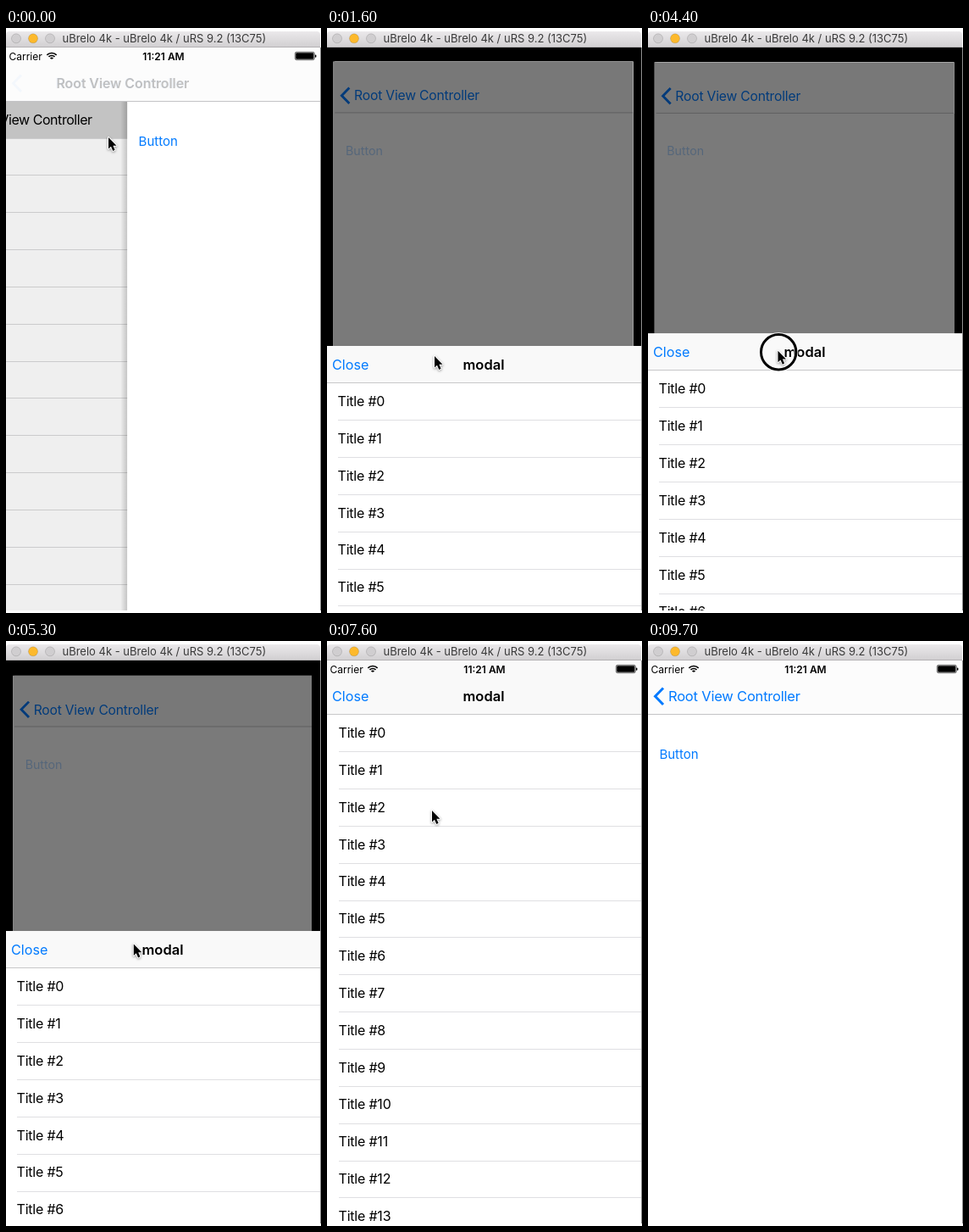
An HTML page with a canvas that plays this animation: 372 by 690 pixels, repeating every 9800 ms.

```html
<!DOCTYPE html>
<html lang="en">
<head>
<meta charset="utf-8">
<title>Half modal demo</title>
<style>
html, body { margin: 0; width: 100%; height: 100%; overflow: hidden; background: #fff; }
canvas { display: block; }
</style>
</head>
<body>
<canvas width="372" height="690"></canvas>
<script>
const ctx = document.querySelector('canvas').getContext('2d');
const LOOP = 9800, STEP = 100;
const W = 371, TOP = 23, BOTTOM = 687, HALF = 375, ROW = 43.85;
const BLUE = '#007aff';

// Timing in ms
const PRESENT = 1050, EXPAND = 6430, DISMISS = 8300;
const DRAG = 1000, GLIDE = 300, TAP = 150, LIFT = 82;
const drags = [
  { at: 2110, x: 123.5, grip: 9 },
  { at: 4130, x: 153.5, grip: 20.5 },
  { at: 5430, x: 149, grip: 12 }
];
const taps = [950, 8200];

const clamp = v => Math.max(0, Math.min(1, v));
const mix = (a, b, u) => a + (b - a) * u;

// Eased 0..1 from start over length
function ramp(t, start, length) {
  const u = clamp((t - start) / length);
  return u * u * (3 - 2 * u);
}

// Top of the half-open sheet: each drag pulls it up, then it falls back
function handleAt(t) {
  return drags.reduce((y, { at }) =>
    y - LIFT * (ramp(t, at, DRAG) - ramp(t, at + DRAG, GLIDE)), HALF);
}

function sheetTop(t) {
  const open = mix(handleAt(t), TOP, ramp(t, EXPAND, 500));
  return mix(BOTTOM, open, ramp(t, PRESENT, 450) - ramp(t, DISMISS, 500));
}

function cursorAt(t) {
  const handle = handleAt(t);
  const moves = [
    { at: 500, x: 42, y: 136 },
    { at: 1200, x: 127, y: 387 },
    ...drags.map(d => ({ at: d.at - GLIDE, x: d.x, y: handle + d.grip })),
    { at: EXPAND + 100, x: 124, y: 200 },
    { at: 7850, x: 28, y: 66 },
    { at: 8900, x: 392, y: 300 }
  ];
  return moves.reduce((p, { at, x, y }) => {
    const u = ramp(t, at, GLIDE);
    return { x: mix(p.x, x, u), y: mix(p.y, y, u) };
  }, { x: 121, y: 129 });
}

function isPressed(t) {
  const during = (start, length) => t >= start && t < start + length;
  return taps.some(at => during(at, TAP)) || drags.some(d => during(d.at, DRAG));
}

function rect(x, y, w, h, color) {
  ctx.fillStyle = color;
  ctx.fillRect(x, y, w, h);
}

function circle(x, y, r) {
  ctx.beginPath();
  ctx.arc(x, y, r, 0, 7);
}

function stroke(color, width) {
  ctx.strokeStyle = color;
  ctx.lineWidth = width;
  ctx.stroke();
}

// y is the middle of the capital letters
function text(str, x, y, size, { color = '#000', weight = 400, align = 'left', spacing = 0 } = {}) {
  ctx.font = `${weight} ${size}px Inter, sans-serif`;
  ctx.letterSpacing = spacing + 'px';
  ctx.textAlign = align;
  ctx.fillStyle = color;
  ctx.fillText(str, x, y + size * 0.36);
}

function faded(alpha, paint) {
  ctx.save();
  ctx.globalAlpha *= alpha;
  paint();
  ctx.restore();
}

function titleBar() {
  const g = ctx.createLinearGradient(0, 4, 0, 22);
  g.addColorStop(0, '#ebe9eb');
  g.addColorStop(1, '#d2d0d2');
  ctx.fillStyle = g;
  ctx.beginPath();
  ctx.roundRect(0, 4, W, 18, [4, 4, 0, 0]);
  ctx.fill();
  rect(0, 22, W, 1, '#b4b2b4');
  ['#d0ced0', '#fdb92c', '#d0ced0'].forEach((color, i) => {
    circle(12 + 20 * i, 12.3, 5.5);
    ctx.fillStyle = color;
    ctx.fill();
    stroke('rgba(0,0,0,.13)', 1);
  });
  text('uBrelo 4k - uBrelo 4k / uRS 9.2 (13C75)', 66.5, 12.6, 13, { color: '#3a3a3a' });
}

function statusBar() {
  text('Carrier', 3.5, 33.3, 12);
  text('11:21 AM', 186, 33.3, 12, { weight: 600, align: 'center' });
  for (let r = 2; r <= 8; r += 3) {
    ctx.beginPath();
    ctx.arc(54, 37.5, r, -Math.PI * 0.75, -Math.PI * 0.25);
    stroke('#000', 1.7);
  }
  ctx.beginPath();
  ctx.roundRect(341.3, 28.3, 23, 9.4, 2);
  stroke('#000', 0.6);
  ctx.fillStyle = '#000';
  ctx.beginPath();
  ctx.roundRect(342.2, 29.2, 21.2, 7.6, 1);
  ctx.roundRect(365, 31.5, 1.4, 3.2, 0.7);
  ctx.fill();
}

function rootPage(p) {
  ctx.save();
  ctx.translate(-0.3 * W * p, 0);
  rect(0, TOP, W * 1.3, BOTTOM - TOP, '#fff');
  rect(0, 87, W, 43, '#d0d0d0');
  text('Modal View Controller', 170, 108, 16, { align: 'right', spacing: -0.45 });
  for (let i = 0; i < 13; i++) rect(14, Math.floor(130 + ROW * i), W, 1, '#d8d8da');
  rect(0, TOP, W * 1.3, BOTTOM - TOP, `rgba(0,0,0,${0.1 * p})`);
  ctx.restore();
}

function navBar(p) {
  rect(0, TOP, W, 64, '#fcfcfc');
  rect(0, 86, W, 1, '#c4c4c6');
  const x = 24 + 88 * (1 - p), label = 'Root View Controller';
  faded(0.6 * (1 - p), () => text(label, x + 1.5, 65, 16, { weight: 600, spacing: -0.1 }));
  faded(clamp((p - 0.6) / 0.4), () => {
    text(label, x, 65.3, 16.5, { color: BLUE, spacing: -0.2 });
    ctx.beginPath();
    ctx.moveTo(18, 55.5);
    ctx.lineTo(8.5, 65.2);
    ctx.lineTo(18, 75);
    stroke(BLUE, 3);
  });
}

function detailPage(p, dim) {
  const left = W * (1 - p);
  if (p < 1) {
    rootPage(p);
    const g = ctx.createLinearGradient(left - 8, 0, left, 0);
    g.addColorStop(0, 'rgba(0,0,0,0)');
    g.addColorStop(1, 'rgba(0,0,0,.18)');
    rect(left - 8, 87, 8, BOTTOM - 87, g);
  }
  rect(left, TOP, W - left, BOTTOM - TOP, '#fff');
  faded(1 - 0.7 * dim, () => text('Button', left + 13.4, 133.7, 15, { color: BLUE }));
  navBar(p);
}

// The page shrinks and darkens behind the sheet
function backdrop(push, shown) {
  const dim = clamp(shown / 0.4);
  const scale = 1 - 0.088 * shown ** 0.75;
  const bleed = 2 * dim;
  ctx.save();
  ctx.translate(W / 2, 355);
  ctx.scale(scale, scale);
  ctx.translate(-W / 2, -355);
  rect(-bleed, TOP, W + bleed, BOTTOM - TOP, '#fff');
  ctx.beginPath();
  ctx.rect(-bleed, TOP, W + bleed, BOTTOM - TOP);
  ctx.clip();
  detailPage(push, dim);
  rect(-bleed, TOP, W + bleed, BOTTOM - TOP, `rgba(0,0,0,${0.52 * dim})`);
  ctx.restore();
}

function sheet(top, full) {
  const bar = 44 + 20 * full, listTop = top + bar, x = 12.5 + full;
  rect(0, top, W, BOTTOM - top, '#fff');
  for (let i = 0; listTop + ROW * i < BOTTOM; i++) {
    const y = listTop + ROW * i;
    text('Title #' + i, x, y + 21.2, 16, { spacing: -0.2 });
    rect(x + 0.5, Math.round(y + 43.2), W, 1, '#dfdfe2');
  }
  rect(0, top, W, bar, '#f9f9f9');
  rect(0, Math.round(listTop - 1), W, 1, '#c8c8ca');
  text('Close', 6, listTop - 22, 16.2, { color: BLUE });
  text('modal', 185, listTop - 22, 16.5, { weight: 600, align: 'center' });
}

function pointer({ x, y }, pressed) {
  if (pressed) {
    circle(x + 0.7, y + 1.5, 20.7);
    stroke('rgba(255,255,255,.8)', 5);
    stroke('#000', 3);
  }
  ctx.save();
  ctx.translate(x, y);
  ctx.shadowColor = 'rgba(0,0,0,.4)';
  ctx.shadowBlur = 3;
  ctx.shadowOffsetY = 1;
  ctx.lineJoin = 'round';
  const arrow = new Path2D('M0 0V13.4L3 10.7 5.3 15.9 7.6 14.8 5.4 9.8H9.5Z');
  ctx.strokeStyle = '#fff';
  ctx.lineWidth = 2;
  ctx.stroke(arrow);
  ctx.shadowColor = 'transparent';
  ctx.fillStyle = '#000';
  ctx.fill(arrow);
  ctx.restore();
}

function draw(t) {
  const push = 1 - 0.386 * (1 - clamp(t / 350)) ** 3;
  const top = sheetTop(t);
  const shown = (BOTTOM - top) / (BOTTOM - TOP);

  rect(0, 0, 372, 690, '#fff');
  ctx.save();
  ctx.beginPath();
  ctx.rect(0, TOP, W, BOTTOM - TOP);
  ctx.clip();
  rect(0, TOP, W, BOTTOM - TOP, '#000');
  backdrop(push, shown);
  if (shown > 0) sheet(top, ramp(t, EXPAND, 500));
  statusBar();
  ctx.restore();

  rect(W, TOP, 1, BOTTOM - TOP, '#8e8e8e');
  titleBar();
  pointer(cursorAt(t), isPressed(t));
}

function tick(now) {
  draw(Math.floor(now % LOOP / STEP) * STEP);
  requestAnimationFrame(tick);
}
tick(performance.now());
</script>
</body>
</html>
```
